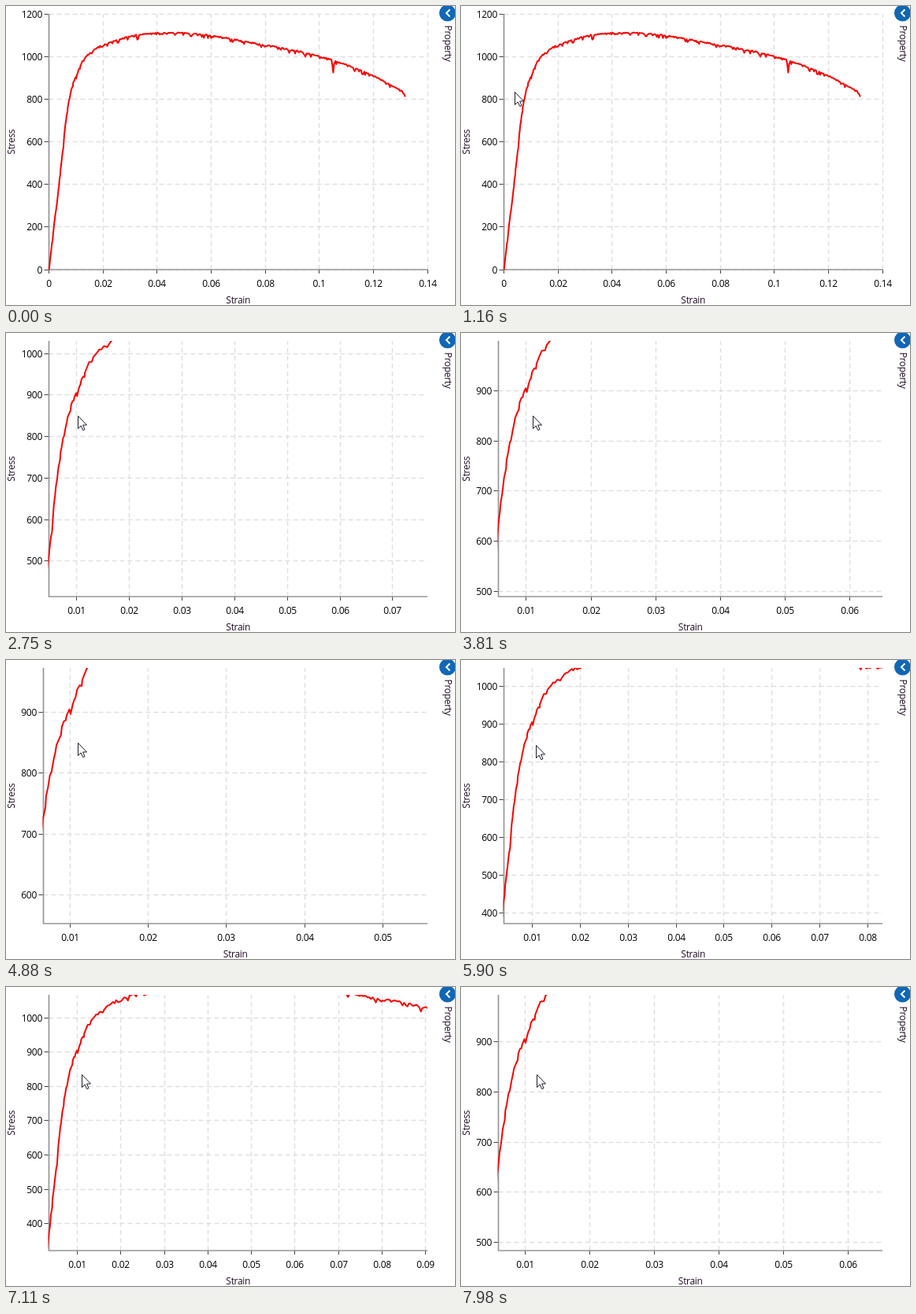
Animation, 570 px wide and 380 px high, one loop 8 s. Source, as an HTML page:

```html
<!DOCTYPE html>
<html lang="en">
<head>
<meta charset="utf-8">
<title>Stress and strain chart</title>
<style>
  html, body { margin: 0; width: 100%; height: 100%; overflow: hidden; background: #fff; }
  svg { display: block; }
  text { font: 12px "Open Sans", "Noto Sans", sans-serif; letter-spacing: -0.3px; fill: #000; }
  .title { fill: #200a24; }
  .grid { stroke: #e0e0e0; stroke-width: 1.5; stroke-dasharray: 6 4; }
  .tick { stroke: #4a3f50; }
  .axis { fill: none; stroke: #969696; stroke-width: 1.7; }
  .curve { fill: none; stroke: #fa0000; stroke-width: 2; stroke-linejoin: round; }
</style>
</head>
<body>
<svg width="570" height="380" viewBox="0 0 570 380">
  <g id="chart"></g>
  <text class="title" text-anchor="middle" transform="translate(10.5 172.7) rotate(-90)">Stress</text>
  <text class="title" text-anchor="middle" transform="translate(556.5 47.5) rotate(90)">Property</text>
  <circle cx="560.5" cy="9" r="10.5" fill="#0f67b5"/>
  <path d="M563.5 4.5l-4.5 4.5 4.5 4.5" fill="none" stroke="#fff" stroke-width="2"/>
  <path id="cursor" d="M.5.5V16.5L4.2 13 6.7 18.6 9 17.6 6.6 12H11.5Z" fill="#fff" stroke="#1c1c2a"/>
</svg>
<script>
const LOOP = 8000, TOP = 10.5, BOTTOM = 335;
const FULL_X = 0.14, FULL_Y = 1200, ZOOM = 1.1;

// Turns of the mouse wheel: start, gap, clicks, direction
const BURSTS = [
  [1630, 260, 2, 1], [1960, 260, 2, 1], [2330, 110, 3, 1], [3340, 250, 4, 1], [4150, 0, 1, 1],
  [4880, 137, 5, -1], [5900, 150, 5, -1], [6910, 90, 4, 1], [7720, 130, 3, 1]
];

// Resting places of the pointer: time, x, y
const POINTER = [
  [1300, 87, 105], [2020, 89, 105], [2750, 91, 105], [5900, 95, 108], [6580, 96.5, 111.5]
];

// Key points of the curve: strain in 1e-3, stress
const KEYS = [
  [0, 0], [1.75, 190], [4.1, 440], [5.45, 606], [7.1, 770], [8.9, 872], [10.3, 915], [12.3, 976],
  [16.5, 1033], [22.2, 1066], [33, 1104], [46, 1113], [60, 1100], [75, 1066], [90, 1033],
  [104, 988], [118, 922], [132, 830]
];
// Sharp drops: strain in 1e-3, depth
const DIPS = [[32.8, 20], [88.8, 20], [94.8, 24], [105.2, 50], [116, 26], [131.7, 22]];

function noise(seed) {
  return () => (seed = (seed * 16807) % 2147483647) / 2147483647;
}

function slope(i) {
  const a = KEYS[Math.max(i - 1, 0)], b = KEYS[Math.min(i + 1, KEYS.length - 1)];
  return (b[1] - a[1]) / (b[0] - a[0]);
}

// Smooth cubic through the key points
function stressAt(x) {
  const i = Math.max(KEYS.findIndex(k => k[0] >= x) - 1, 0);
  const [x0, y0] = KEYS[i], [x1, y1] = KEYS[i + 1];
  const d = x1 - x0, u = (x - x0) / d, v = 1 - u;
  return v * v * (1 + 2 * u) * y0 + u * u * (1 + 2 * v) * y1 +
    u * v * d * (v * slope(i) - u * slope(i + 1));
}

function makeCurve() {
  const pts = [[0, 0]], rand = noise(4711);
  for (let x = 0.2; x < 132; x += x < 12 ? 0.22 : 0.38) {
    let y = stressAt(x) + rand() * 4 - 2;
    if (rand() < 0.3) y -= 3 + 12 * rand() ** 2;
    for (const [at, depth] of DIPS) y -= depth * Math.max(0, 1 - Math.abs(x - at) / 0.5);
    pts.push([(x + (rand() - 0.5) * 0.16) / 1e3, y]);
  }
  return pts;
}

const layout = n => ({ left: n >= 9 ? 47.5 : 54.5, right: n === 2 || n === 3 ? 538.5 : 535 });

function pointerAt(t) {
  if (t < 540) return null;
  if (t >= 1300) return POINTER.filter(p => p[0] <= t).pop().slice(1);
  const u = Math.floor((t - 540) / 69) / 11;
  if (u < 0.8) {
    const p = 1 - (1 - u / 0.8) ** 2;
    return [402 - 335 * p, 372 - 262 * p];
  }
  const p = (u - 0.8) / 0.2;
  return [67 + 20 * p, 110 - 5 * p];
}

const clamp = (v, max) => Math.min(Math.max(v, 0), max);

// One wheel click keeps the value under the pointer in place.
function zoomStep(view, t, dir) {
  const [px, py] = pointerAt(t), { left, right } = layout(view.n);
  const n = view.n + dir, w = FULL_X / ZOOM ** n, h = FULL_Y / ZOOM ** n;
  const x = clamp(view.x + (view.w - w) * (px - left) / (right - left), FULL_X - w);
  const y = clamp(view.y + (view.h - h) * (BOTTOM - py) / (BOTTOM - TOP), FULL_Y - h);
  return { t, n, x, y, w, h };
}

function makeViews() {
  const list = [{ t: 0, n: 0, x: 0, y: 0, w: FULL_X, h: FULL_Y }];
  for (const [start, gap, clicks, dir] of BURSTS)
    for (let i = 0; i < clicks; i++) list.push(zoomStep(list[list.length - 1], start + i * gap, dir));
  return list;
}

function marks(min, size, step) {
  const list = [];
  for (let i = Math.ceil(min / step - 1e-6); i * step <= min + size + step * 1e-6; i++) list.push(i * step);
  return list;
}

const line = (cls, x1, y1, x2, y2) =>
  `<line class="${cls}" x1="${x1}" y1="${y1}" x2="${x2}" y2="${y2}"/>`;
const label = (str, x, y, anchor, cls = "") =>
  `<text class="${cls}" x="${x}" y="${y}" text-anchor="${anchor}">${str}</text>`;
const crisp = v => Math.floor(v) + 0.5;

const curve = makeCurve(), views = makeViews();
const chart = document.getElementById("chart"), cursor = document.getElementById("cursor");

function drawChart({ n, x, y, w, h }) {
  const { left, right } = layout(n), fine = n >= 5;
  const sx = v => left + (v - x) / w * (right - left);
  const sy = v => BOTTOM - (v - y) / h * (BOTTOM - TOP);
  let grid = "", ticks = "";
  for (const v of marks(x, w, fine ? 0.01 : 0.02)) {
    const p = crisp(sx(v));
    grid += line("grid", p, BOTTOM, p, TOP);
    ticks += line("tick", p, BOTTOM, p, 340) + label(+v.toFixed(3), p, 357, "middle");
  }
  for (const v of marks(y, h, fine ? 100 : 200)) {
    const p = crisp(sy(v));
    grid += line("grid", left, p, right, p);
    ticks += line("tick", left - 6, p, left, p) + label(v, left - 8.5, p + 4, "end");
  }
  const pts = curve.map(([a, b]) => sx(a).toFixed(1) + "," + sy(b).toFixed(1)).join(" ");
  const box = [left - 1, 10, right - left + 1, 326];
  chart.innerHTML = grid + ticks +
    `<path class="axis" d="M${left} 10V335H${right}"/>` +
    `<svg x="${box[0]}" y="${box[1]}" width="${box[2]}" height="${box[3]}" viewBox="${box.join(" ")}">` +
    `<polyline class="curve" points="${pts}"/></svg>` +
    label("Strain", (left + right) / 2, 378, "middle", "title");
}

let shown = null;
function render(now) {
  const t = now % LOOP;
  const view = views.filter(v => v.t <= t).pop();
  if (view !== shown) drawChart(shown = view);
  const p = pointerAt(t);
  cursor.style.display = p ? "" : "none";
  if (p) cursor.setAttribute("transform", `translate(${p.map(Math.floor)})`);
}

const start = performance.now();
function tick() {
  render(performance.now() - start);
  requestAnimationFrame(tick);
}
tick();
</script>
</body>
</html>
```
